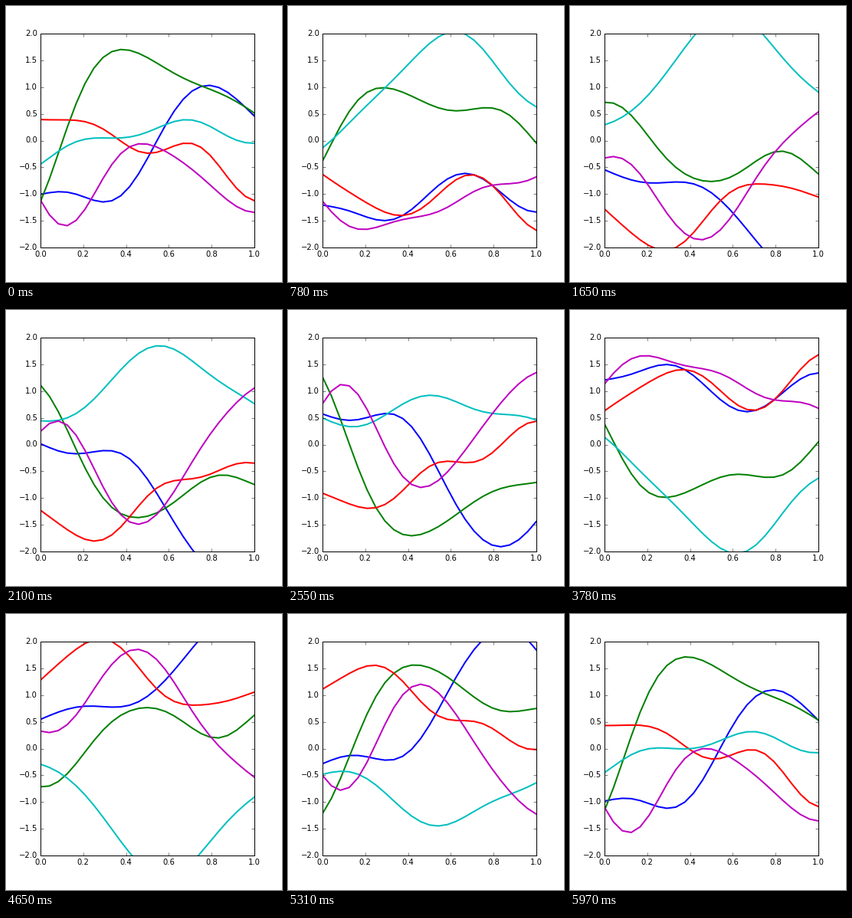
Write a matplotlib script that moves like this. It is 360 px wide and 360 px high and loops after 6000 ms.

```python
import numpy as np
import matplotlib.pyplot as plt
from matplotlib.animation import FuncAnimation

FRAMES, INTERVAL = 200, 30

plt.style.use("classic")
plt.rcParams.update({
    "figure.dpi": 72,
    "savefig.dpi": "figure",
    "figure.facecolor": "white",
    "font.family": "DejaVu Sans",
    "font.size": 10,
})

# Key heights of each colour at the start and a quarter turn later.
KEYS = {
    "b": ([-1.005, -.957, -1.118, -.863, .28, 1.012, .773, .458],
          [-.712, -.842, -.98, -.957, -1.25, -1.934, -2.409, -2.266]),
    "g": ([-1.142, -.238, 1.356, 1.688, 1.354, 1.025, .726, .514],
          [.544, .587, .063, -.445, -.489, -.123, -.233, -.551]),
    "r": ([.392, .387, .301, -.122, -.168, -.126, -.892, -1.125],
          [-1.234, -1.54, -2.013, -1.76, -1.017, -.845, -1.093, -1.247]),
    "c": ([-.443, -.202, .046, .066, .297, .342, .006, -.05],
          [.226, .413, 1.085, 1.984, 2.488, 2.023, 1.205, .909]),
    "m": ([-1.115, -1.557, -1.007, -.116, -.199, -.678, -1.233, -1.344],
          [-.506, -.587, -1.284, -1.874, -1.527, -.57, .075, .331]),
}

knots = np.r_[0, np.arange(1, 12, 2), 12] / 12
x = np.linspace(0, 1, 25)


def kernel(a, b, scale=0.2):
    return np.exp(-0.5 * ((a[:, None] - b[None, :]) / scale) ** 2)


# Gaussian-process mean: maps key heights to the plotting grid.
gram = kernel(knots, knots) + 1e-5 * np.eye(len(knots))
smooth = np.linalg.solve(gram, kernel(knots, x)).T

fig = plt.figure(figsize=(5, 5))
ax = fig.add_axes([0.125, 0.125, 0.775, 0.775])
ax.set_xlim(0, 1)
ax.set_ylim(-2, 2)

paths = [smooth @ np.transpose(keys) for keys in KEYS.values()]
lines = [ax.plot([], [], color=color, lw=2)[0] for color in KEYS]


def update(i):
    """Walk each curve once around the circle spanned by its two shapes."""
    angle = 2 * np.pi * i / FRAMES
    turn = np.array([np.cos(angle), np.sin(angle)])
    for line, path in zip(lines, paths):
        line.set_data(x, path @ turn)
    return lines


anim = FuncAnimation(fig, update, frames=FRAMES, interval=INTERVAL,
                     init_func=lambda: update(0), repeat=True, repeat_delay=0)
plt.show()
```
